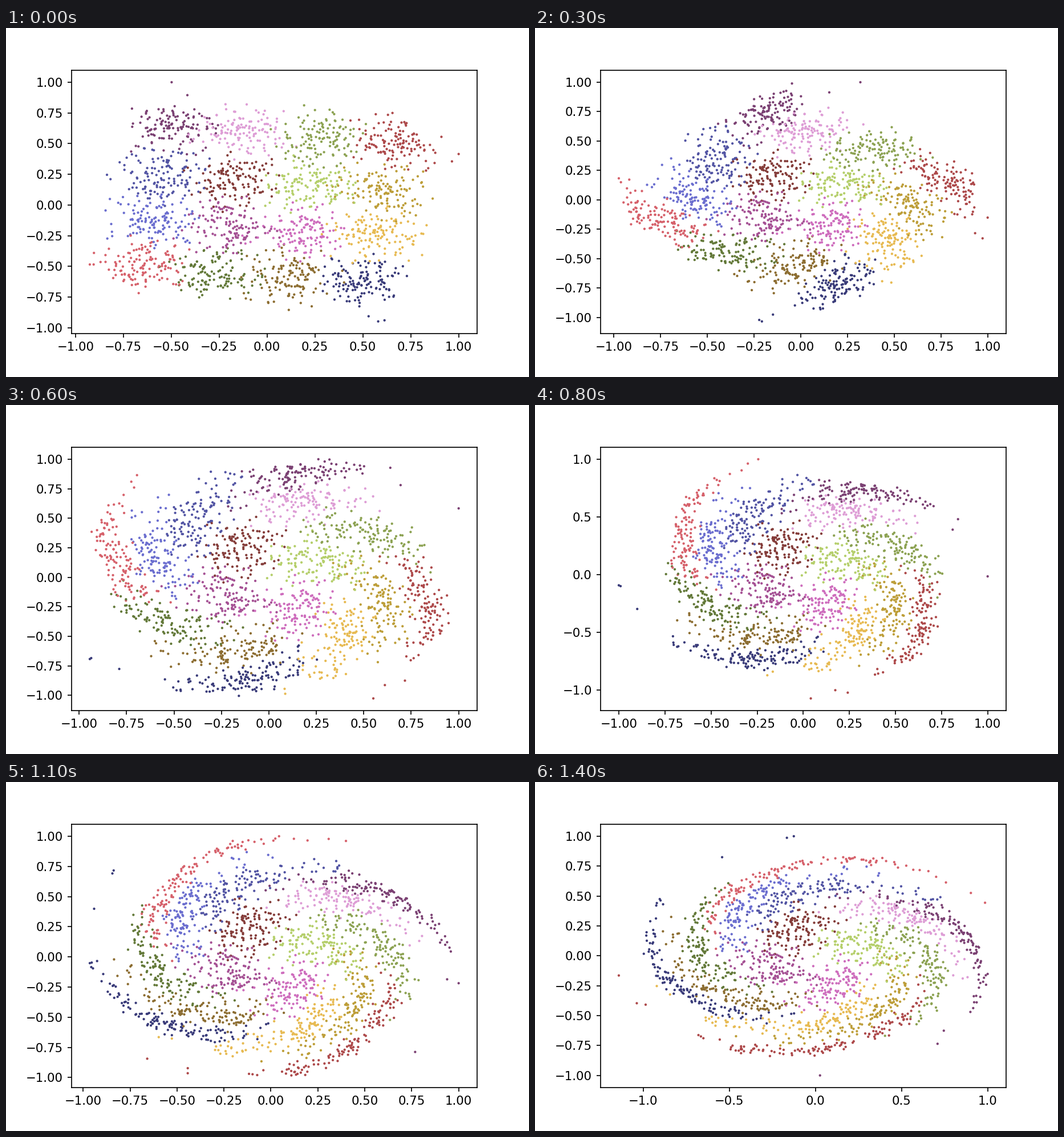
Write a matplotlib script that moves like this. It is 917 px wide and 611 px high and loops after 1500 ms.

```python
import numpy as np
import matplotlib.pyplot as plt
from matplotlib.animation import FuncAnimation

W, H, DPI = 917, 611, 917 / 6
FRAMES, INTERVAL = 15, 100
TWIST = 0.205            # radians per step at unit radius
PER_BLOB = 124
SPREAD = (0.118, 0.106)

# Colour index of each blob on the 4 x 4 lattice, top row first
GRID = [[12, 15, 4, 10], [1, 9, 5, 7], [2, 13, 14, 8], [11, 3, 6, 0]]

# Strays beyond the unit circle, which set the extent of the cloud
STRAYS = {
    0: [(0.53, -0.907), (0.58, -0.949), (0.613, -0.94)],
    10: [(1, 0.415), (0.965, 0.355), (0.91, 0.555)],
    11: [(-0.925, -0.485), (-0.905, -0.485)],
    12: [(-0.498, 1), (-0.705, 0.785)],
}


def blob(rng, row, col):
    """Gaussian cluster around one point of a slightly turned lattice."""
    u, v = col - 1.5, 1.5 - row
    centre = 0.39 * u + 0.05 * v, 0.38 * v - 0.045 * u
    z = rng.normal(size=(PER_BLOB * 2, 2))
    p = z * SPREAD + centre
    keep = (np.hypot(*z.T) < 2.6) & (np.hypot(*p.T) < 1)
    return p[keep][:PER_BLOB]


def make_cloud():
    rng = np.random.default_rng(4)
    points, labels = [], []
    for row, line in enumerate(GRID):
        for col, k in enumerate(line):
            p = np.vstack([blob(rng, row, col), *STRAYS.get(k, [])])
            points.append(p)
            labels += [k] * len(p)
    order = rng.permutation(len(labels))
    return np.vstack(points)[order], np.array(labels)[order]


def swirl(n):
    """Turn each point by its squared radius, then scale the maxima to 1."""
    x, y = cloud.T
    turn = -TWIST * n * (x ** 2 + y ** 2)
    c, s = np.cos(turn), np.sin(turn)
    p = np.column_stack([x * c - y * s, x * s + y * c])
    return p / p.max(axis=0)


def limits(v, margin=0.05):
    pad = margin * np.ptp(v)
    return v.min() - pad, v.max() + pad


def update(n):
    p = swirl(n)
    dots.set_offsets(p)
    ax.set_xlim(limits(p[:, 0]))
    ax.set_ylim(limits(p[:, 1]))
    return dots,


cloud, labels = make_cloud()
fig, ax = plt.subplots(figsize=(W / DPI, H / DPI), dpi=DPI)
fig.subplots_adjust(left=0.125, right=826 / W, bottom=0.125, top=537 / H)
dots = ax.scatter(*cloud.T, s=1, c=labels, cmap="tab20b")

anim = FuncAnimation(fig, update, frames=FRAMES, interval=INTERVAL,
                     init_func=lambda: update(0), repeat=True, repeat_delay=0)
plt.show()
```
